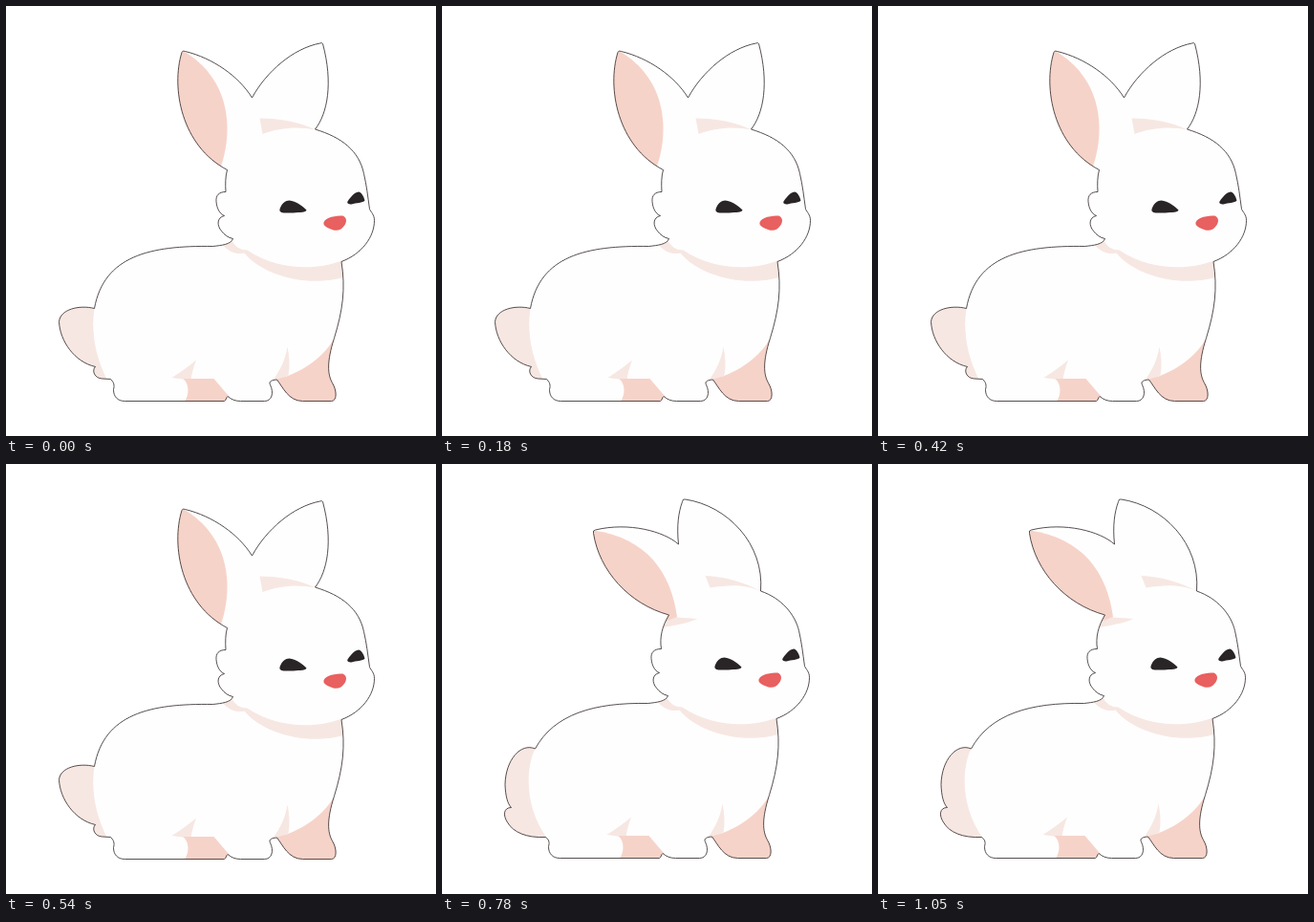
An HTML page for the animation above (1080 ms loop, 450 by 450 pixels).

```html
<!DOCTYPE html>
<html lang="en">
<head>
<meta charset="utf-8">
<title>Rabbit</title>
<style>
  html, body { margin: 0; width: 100%; height: 100%; overflow: hidden; background: #fff; }
  svg { display: block; width: 100vw; height: 100vh; }
  .white { fill: #fefefe; }
  .light { fill: #f7e7e2; }
  .pink { fill: #f6d3c9; }
  .eye { fill: #292425; }
  .nose { fill: #e8605f; }
  .line { fill: none; stroke: #2b2222; stroke-width: .8; stroke-linejoin: round; shape-rendering: crispEdges; }
</style>
</head>
<body>
<svg id="stage" viewBox="0 0 450 450"></svg>
<script>
const LOOP = 1080;
const SWITCH = 600;

// Outline pieces common to both poses
const cheek = `C222,194 219,198 219.5,204 C220,211 223,217 228,219
  C220,221 220,229 225,235 C228,239 232,242 237,243 C235,249 225,250 216,251`;
const legsAndFace = `C113,394 113,397 112,401 C112,408 116,413 124,413 H228
  C230,412 230,409 231.5,408 C235,411 239,413 245,413 H270
  C278,413 280,404 276,396 C274,392 278,391 283,390.5
  C289,398 295,413 310,413 H340 C346,413 346,402 341,394
  C336,385 335,372 343,347 C352,318 355,295 350.5,267
  C372,259 385,241 385,224 C385,218 382,216 380,212 C378,198 377,188 374,175`;

const poses = [
  {
    shift: [0.5, 0.5],
    start: 'M231,171 C229,178 229,186 229.5,194',
    back: `C150,250 102,261 92,316 C76,312 56,317 55,330
      C56,350 71,372 93,377 C89,381 92,389 100,389.5 L109,390`,
    ears: `C369,151 351,137 323,128.5 C336,112 342,80 331,39 Q330,37.5 328,38.5
      C300,44 272,68 257,95.5 C243,73 216,54 187,47 Q184.5,45.5 183.5,48
      C172,85 183,146 231,171 Z`,
    light: [
      'M92,316 C88,342 94,368 105,390 L50,400 V300 Z',
      'M265,117 C285,117 308,121 323,129 C305,125 285,127 268,133.5 Z'
    ],
    ear: 'M224.5,167 C236.5,132 236.5,76 184,46 L170,60 V110 L200,160 Z'
  },
  {
    shift: [-0.5, -0.5],
    start: 'M238,158.5 C231,170 228,182 230,194',
    back: `C160,250 118,262 98,298.5 C83,292 67,310 66.5,336 C67,348 69,356 73,360
      C65,360 64,368 69,375.5 C75,386 89,392 109,391`,
    ears: `C370,158 356,141 334,133.5 C338,84 299,44 255,37.5 Q252.5,36.5 252,40
      C248,51 246,65 248,84.5 C233,71 196,61 161,69.5 Q158,70 159,73
      C165,112 196,147 238,158.5 Z`,
    light: [
      'M98,298 C87,322 88,362 111,393 L50,400 V280 Z',
      'M276,117.5 C296,118 316,124 334,133.5 C316,126 301,127 281,130 Z',
      'M237,158 L247,161 L268,162.5 C258,167 246,169 232,171.5 Z'
    ],
    ear: 'M246.5,160.5 C240,114 215,78 159,70 L150,90 L190,150 L235,165 Z'
  }
];

const sharedLight = [
  `M236,245 L226,249 C232,257 241,260 249,258 C268,282 318,295 355,282.5
    L351,266 C325,276 285,277 252,255 C244,255 238,250 236,245 Z`,
  'M173,388.5 Q188,379 198.5,370 C196,377 194,383 193,391 L184,390 Z',
  'M294,356 C292,370 286,381 279,391 L284,391 L295,386 C297,376 296,366 294,356 Z'
];
const sharedPink = [
  'M185,389.5 H217 L232,407 V414 H186 C192,405 191,395 185,389.5 Z',
  'M283,390 C312,383 333,365 344,346 L360,380 V420 H290 Z'
];
const eyes = [
  `M286,212 C288,206 292,203 296,203 C303,204 309,208 314,213
    C313,216 308,215 300,216 C292,216 285,217 286,212 Z`,
  `M357,204 C361,198 365,194 369,194 C373,196 374,200 375,203
    C373,206 366,205 361,207 C358,207 356,206 357,204 Z`
];
const nose = `M332,226 C334,220 345,219 352,219 C357,221 356,227 353,230
  C350,234 347,235 342,234 C337,232 331,230 332,226 Z`;

const path = cls => d => `<path class="${cls}" d="${d}"/>`;
const paths = (cls, list) => list.map(path(cls)).join('');

function rabbit(pose, i) {
  const outline = pose.start + cheek + pose.back + legsAndFace + pose.ears;
  return `<g class="pose" transform="translate(${pose.shift})">
    <clipPath id="body${i}"><path d="${outline}"/></clipPath>
    <g clip-path="url(#body${i})">
      ${path('white')(outline)}
      ${paths('light', [...pose.light, ...sharedLight])}
      ${paths('pink', [pose.ear, ...sharedPink])}
    </g>
    ${path('line')(outline)}
    ${paths('eye', eyes)}
    ${path('nose')(nose)}
  </g>`;
}

const stage = document.getElementById('stage');
stage.innerHTML = poses.map(rabbit).join('');
const groups = stage.querySelectorAll('.pose');

function draw(now) {
  const current = now % LOOP < SWITCH ? 0 : 1;
  groups.forEach((g, i) => g.setAttribute('visibility', i === current ? 'visible' : 'hidden'));
}

const begin = performance.now();
function tick() {
  draw(performance.now() - begin);
  requestAnimationFrame(tick);
}
tick();
</script>
</body>
</html>
```
